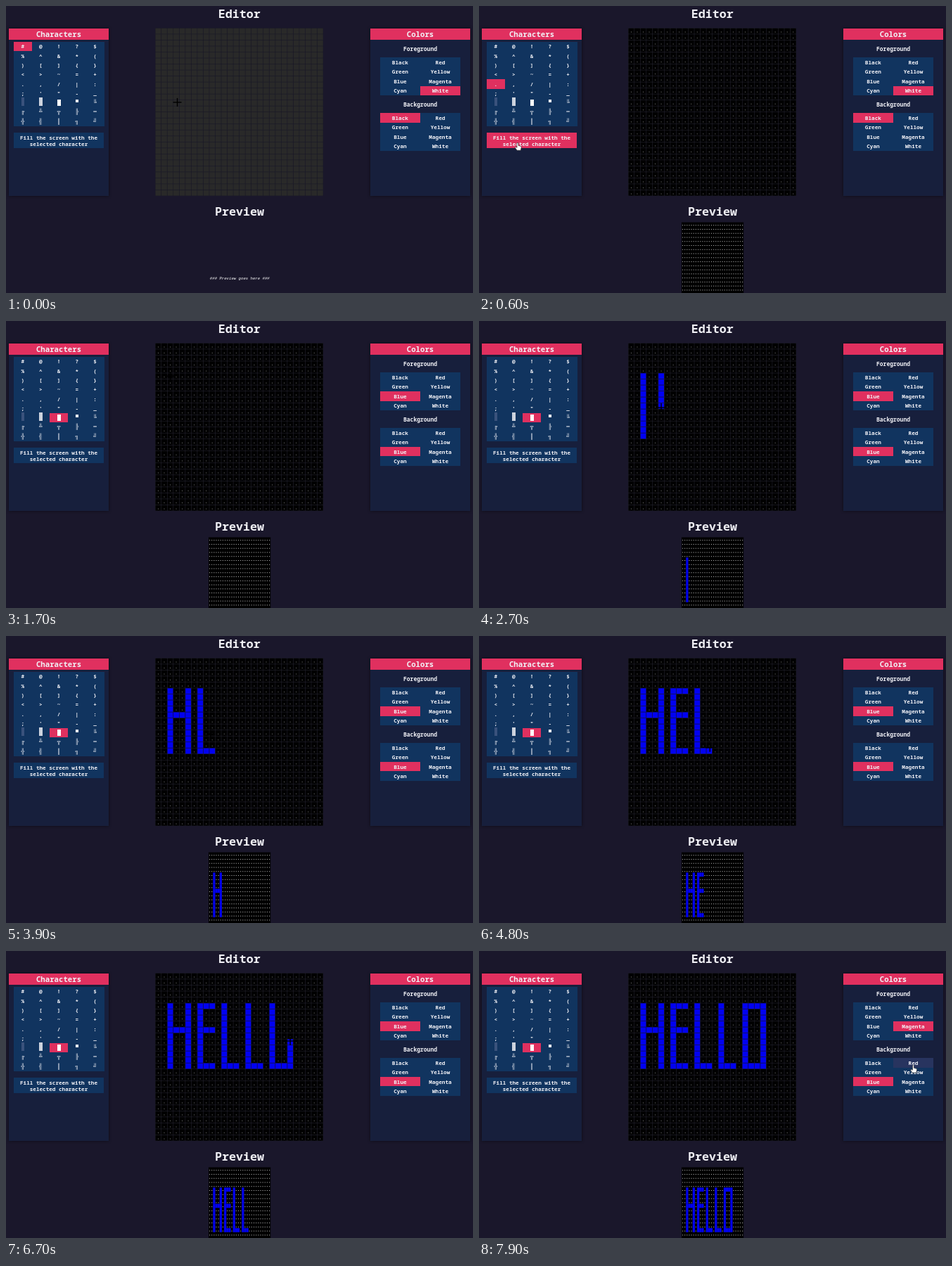
An HTML page with a canvas for the animation above (8000 ms loop, 664 px wide and 408 px high).

```html
<!DOCTYPE html>
<html lang="en">
<head>
<meta charset="utf-8">
<title>Character editor</title>
<style>
html, body { margin: 0; width: 100%; height: 100%; overflow: hidden; background: #1a172b; }
canvas, svg { position: absolute; left: 0; top: 0; }
rect { shape-rendering: crispEdges; }
text { font-family: "Noto Sans Mono", "DejaVu Sans Mono", monospace; font-weight: 600; fill: #f1f1f6; text-anchor: middle; white-space: pre; }
.title { font-weight: 700; }
.hint { font: italic 5.67px "Liberation Mono", monospace; fill: #fff; }
.panel { filter: drop-shadow(0 0 2px #0008); }
</style>
</head>
<body>
<canvas id="stage" width="664" height="408"></canvas>
<svg id="ui" width="664" height="408" viewBox="0 0 664 408"></svg>
<script>
const LOOP = 8000, N = 28;
const BLUE = '#0202f0', BUTTON = [17, 52, 95], ACCENT = [224, 48, 95];
const GRID = { x: 212.2, y: 31.4, w: 8.53, h: 8.52 };
const PREVIEW = { x: 288, y: 307.5, w: 3.15, h: 5.76 };
const ctx = document.getElementById('stage').getContext('2d');
const ui = document.getElementById('ui');

function add(tag, attrs, content = '') {
  const el = document.createElementNS('http://www.w3.org/2000/svg', tag);
  for (const k in attrs) el.setAttribute(k, attrs[k]);
  el.textContent = content;
  ui.append(el);
  return el;
}
const rect = (x, y, width, height, fill, more) => add('rect', { x, y, width, height, fill, ...more });
// y is the middle of the capitals
const label = (s, x, y, size, more) =>
  add('text', { x, y: y + size * 0.357, 'font-size': size, ...more }, s);

const buttons = [];
function button(group, id, x, y, w, h) {
  buttons.push({ group, id, x, y, w, h, el: rect(x, y, w, h) });
}

function panel(x, title) {
  rect(x, 32, 142, 238, '#171f3c', { class: 'panel' });
  rect(x, 32, 142, 16, `rgb(${ACCENT})`);
  label(title, x + 71, 40.3, 10.7);
}

// Static layout
label('Editor', 331.7, 11.5, 16.7, { class: 'title' });
label('Preview', 332, 292.3, 16.7, { class: 'title' });
const hint = add('text', { x: 332.3, y: 389.3, class: 'hint' }, '### Preview goes here ###');

panel(4, 'Characters');
const glyphs = [...'#@!?$%^&*()[]{}<>~=+.,/|:;\'"-_▒█▄▀╚╔╩╦╠═╬╣║╗╝'];
const blocks = { '▒': [0, 12, '#3a527c'], '█': [0, 12, '#cdd3de'], '▄': [3, 9, '#fff'], '▀': [3, 4, '#fff'] };
glyphs.forEach((g, i) => {
  const x = 11 + i % 5 * 25.7, y = 51 + Math.floor(i / 5) * 13.3;
  button('char', g, x, y, 25.7, 13.3);
  if (blocks[g]) {
    const [top, height, fill] = blocks[g];
    rect(x + 10.5, 130 + top, 4.6, height, fill);
  } else label(g, x + 12.7, y + 6.6, 7.7);
});
button('fill', '', 11, 180, 128, 22);
label('Fill the screen with the', 75, 187.2, 7.65);
label('selected character', 75, 195.8, 7.65);

panel(518, 'Colors');
const names = ['Black', 'Red', 'Green', 'Yellow', 'Blue', 'Magenta', 'Cyan', 'White'];
[['Foreground', 'fg', 73.4], ['Background', 'bg', 152.2]].forEach(([title, group, top]) => {
  label(title, 589, top - 12.2, 8);
  names.forEach((name, i) => {
    const x = 531.8 + i % 2 * 57.1, y = top + (i >> 1) * 13.4;
    button(group, name, x, y, 57.1, 13.4);
    label(name, x + 28.6, y + 6.8, 7.7);
  });
});

const arrow = 'M0 0V10L2.4 7.8L4 11.4L5.4 10.8L3.8 7.2H7Z';
const hand = 'M-1 1Q0 -.6 1 1V4.4L4.6 5.4Q5.4 5.8 5.2 7L4.3 11.2H-1L-3.6 7.4Q-3.8 6 -2.4 6.4L-1 7.4Z';
const pointer = add('path', { fill: '#fff', stroke: '#222', 'stroke-width': 0.6 });

// Clicks: time, group, value, sideways offset from the button's middle
const initial = { char: '#', fg: 'White', bg: 'Black' };
const clicks = [
  [250, 'char', '.'], [500, 'fill', '', -20], [1020, 'fg', 'Blue'], [1250, 'bg', 'Blue'],
  [1480, 'char', '▄'], [7670, 'fg', 'Magenta'], [LOOP, 'bg', 'Red']
];
const FILL_AT = clicks[1][0];
const ARRIVE = 100, LINGER = 120;

// Letters: start time, column, then strokes as [dx, dy, moves]
const stemAndFoot = [0, 0, 'D10R2'];
const letters = [
  [1950, 2, [0, 0, 'D10'], [3, 0, 'D10'], [1, 4, 'R1']],
  [3366, 7, stemAndFoot, [1, 0, 'R1'], [1, 4, 'R1']],
  [4276, 11, stemAndFoot],
  [5150, 15, stemAndFoot],
  [5980, 19, [0, 0, 'D10R3U10L2']]
];
const TOP = 5, STEP = 42, LIFT = 110, RELEASE = 60;
const MOVES = { D: [0, 1], U: [0, -1], R: [1, 0], L: [-1, 0] };

function drawnCells() {
  const all = [];
  for (const [start, left, ...strokes] of letters) {
    let t = start;
    for (const [dx, dy, moves] of strokes) {
      const stroke = [{ col: left + dx, row: TOP + dy, t }];
      for (const [, dir, count] of moves.matchAll(/(\D)(\d+)/g))
        for (let i = 0; i < count; i++) {
          const { col, row } = stroke.at(-1);
          stroke.push({ col: col + MOVES[dir][0], row: row + MOVES[dir][1], t: t += STEP });
        }
      for (const c of stroke) c.shown = t + RELEASE;
      all.push(...stroke);
      t += LIFT;
    }
  }
  return all;
}
const cells = drawnCells();

// Cursor path: rest on each clicked button, pass through each drawn cell
const onCell = (col, row) => [GRID.x + (col + 0.5) * GRID.w, GRID.y + (row + 0.5) * GRID.h];
const path = [[0, ...onCell(3.35, 11.9)]];
for (const [at, group, id, dx = 0] of clicks) {
  const b = buttons.find(b => b.group === group && b.id === id);
  const spot = [b.x + b.w / 2 + dx, b.y + b.h / 2 + 3];
  path.push([at - ARRIVE, ...spot], [at + LINGER, ...spot]);
}
path.push([letters[0][0] - 250, ...onCell(2, TOP)]);
for (const c of cells) path.push([c.t, ...onCell(c.col, c.row)]);
path.sort((a, b) => a[0] - b[0]);

function cursorAt(t) {
  if (t <= 0) return path[0].slice(1);
  const i = path.findIndex(p => p[0] >= t);
  const [t0, x0, y0] = path[i - 1], [t1, x1, y1] = path[i];
  const k = (t - t0) / (t1 - t0);
  return [x0 + (x1 - x0) * k, y0 + (y1 - y0) * k];
}

const inside = (b, [x, y]) => x >= b.x && x < b.x + b.w && y >= b.y && y < b.y + b.h;

function drawGrid(t) {
  const filled = t >= FILL_AT;
  ctx.fillStyle = filled ? '#24232f' : '#191827';
  ctx.fillRect(GRID.x, GRID.y, N * GRID.w, N * GRID.h);
  const cell = (col, row, fill) => {
    ctx.fillStyle = fill;
    ctx.fillRect(GRID.x + col * GRID.w + 0.3, GRID.y + row * GRID.h + 0.3, GRID.w - 0.6, GRID.h - 0.6);
  };
  for (let i = 0; i < N * N; i++) {
    const col = i % N, row = Math.floor(i / N);
    cell(col, row, filled ? '#000' : '#292929');
    if (!filled) continue;
    ctx.fillStyle = '#808080';
    ctx.fillRect(GRID.x + (col + 0.44) * GRID.w, GRID.y + (row + 0.6) * GRID.h, 1, 1);
  }
  for (const c of cells) if (t >= c.t) cell(c.col, c.row, BLUE);
}

function drawPreview(t) {
  const { x, y, w, h } = PREVIEW;
  ctx.fillStyle = '#000';
  ctx.fillRect(x, y, N * w, N * h);
  ctx.fillStyle = '#a8a8a8';
  for (let i = 0; i < N * 18; i++)
    ctx.fillRect(x + (i % N + 0.3) * w, y + Math.floor(i / N) * h + 3.7, 1.2, 1);
  ctx.fillStyle = BLUE;
  for (const c of cells)
    if (t >= c.shown) ctx.fillRect(x + c.col * w, y + c.row * h, w + 0.1, h + 0.1);
}

function drawButtons(t) {
  const chosen = { ...initial };
  for (const [at, group, id] of clicks) if (t >= at && group !== 'fill') chosen[group] = id;
  const trail = [0, 25, 50].map(d => cursorAt(t - d));
  for (const b of buttons) {
    const hover = trail.filter(p => inside(b, p)).length / trail.length;
    const k = chosen[b.group] === b.id ? 1 : hover ** 2;
    b.el.setAttribute('fill', `rgb(${BUTTON.map((v, i) => Math.round(v + (ACCENT[i] - v) * k))})`);
  }
}

function drawCursor(t) {
  const p = cursorAt(t), [x, y] = p;
  const onGrid = inside({ x: GRID.x, y: GRID.y, w: N * GRID.w, h: N * GRID.h }, p);
  pointer.style.display = onGrid ? 'none' : '';
  if (onGrid) {
    ctx.fillStyle = '#000';
    ctx.fillRect(x - 6, y - 0.7, 12, 1.4);
    ctx.fillRect(x - 0.7, y - 6, 1.4, 12);
  } else {
    pointer.setAttribute('d', buttons.some(b => inside(b, p)) ? hand : arrow);
    pointer.setAttribute('transform', `translate(${x} ${y})`);
  }
}

function frame() {
  const t = performance.now() % LOOP;
  ctx.clearRect(0, 0, 664, 408);
  drawGrid(t);
  hint.style.display = t < FILL_AT ? '' : 'none';
  if (t >= FILL_AT) drawPreview(t);
  drawButtons(t);
  drawCursor(t);
  requestAnimationFrame(frame);
}
frame();
</script>
</body>
</html>
```
